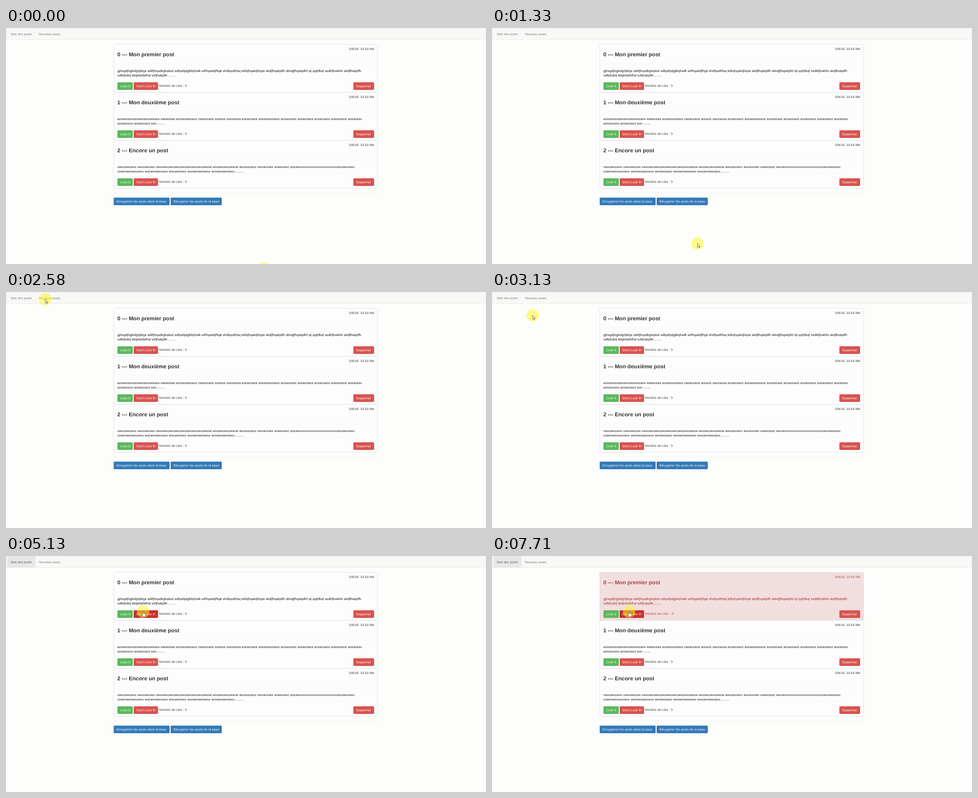
An HTML page for the animation above (8 s loop, 1064 by 526 pixels).

```html
<!DOCTYPE html>
<html lang="fr">
<head>
<meta charset="utf-8">
<style>
  html, body { margin: 0; width: 100%; height: 100%; overflow: hidden; background: #fdfdfb; }
  svg { display: block; }
  text { font: 7px "Liberation Sans", Arial, sans-serif; fill: currentColor; letter-spacing: .15px; text-rendering: geometricPrecision; }
  .title { font-size: 12px; font-weight: bold; letter-spacing: 0; }
  .end { text-anchor: end; }
  .body { stroke: currentColor; stroke-width: .12; }
  .wide { letter-spacing: .25px; }
  .tight { letter-spacing: .06px; }
  .label { fill: #fff; }
  .rule { stroke: #eee; stroke-width: .6; }
  .post { color: #333; }
  .card { fill: #fdfdfd; stroke: #d4d4e4; stroke-width: .6; }
  .post.bad { color: #a94442; }
  .bad .card { fill: #f2dede; }
  .green { fill: #5cb85c; }
  .red { fill: #d9534f; }
  .blue { fill: #337ab7; }
  .red.hover { fill: #c9302c; }
  #nav { color: #777; }
  #status text { font: 6px "Open Sans", sans-serif; fill: #888; letter-spacing: 0; }
  .shape { fill: #fff; stroke: #111; stroke-width: .6; stroke-linejoin: round; }
</style>
</head>
<body>
<svg id="stage" width="1064" height="526" viewBox="0 0 1064 526"></svg>
<script>
const posts = [
  ['Mon premier post', '',
    'gjhsgdjhgjhdghjkfgs sdkfjhqsdkghqksd sdfqshjdgjkfqhsdk sdfhqskdjfhgk shdfqsdhfsq kdfsjhqskdjhqsk skdjfhqskjdfh skkdjjfhqskjdhf sjl qsjhfkqf ssdkfjhskhfs skdjfhskjdfh',
    'sdfkjhskfj ldsjkfsldkfhsl sdfjhskjdfh.........'],
  ['Mon deuxième post', '',
    'azeazeazeazeazeazeazeaze eaeazeae azeazeazeaze zaeazeaze azeaze eazeazea azeazeaze azeazeazeaze azeazeaze azeazeaze azeazeaze azeazeaze azeazeaz',
    'azeazeaze azeazeaze aze.........'],
  ['Encore un post', 'wide',
    'cwxcwxcwxc cwxcwxcwx cwxcwxcwxcwxcwxcwxcwxcwxcwxcw wxcwxcwxcwxcw wxcwxcwxc wxcwxcwx xcwxcwxc wxcw' + 'x'.repeat(22) + 'cwxcwxcwxc',
    'cxwxcwxcwxcwxc wxcwxcwxcwxc wxcwxcwxc wxcwxcwxcwxc wxcwxcwxcwxc.........']
];
const rowHeight = 107;

const text = (x, y, s, cls = '') => `<text x="${x}" y="${y}" class="${cls}">${s}</text>`;
const rule = (x1, x2, y) => `<path class="rule" d="M${x1} ${y}H${x2}"/>`;
const button = (x, y, w, color, s, cls = '') =>
  `<rect class="${color}" x="${x}" y="${y}" width="${w}" height="17" rx="2"/>` +
  text(x + 6.3, y + 10.7, s, 'label ' + cls);

const post = ([title, spacing, line1, line2], i) => `
  <g class="post" transform="translate(0 ${rowHeight * i})">
    <rect class="card" x="238.75" y="36.4" width="585" height="${rowHeight}" rx="1.5"/>
    ${text(816, 49, '5/9/18, 10:53 AM', 'end')}
    ${text(246.8, 62.8, `${i} --- ${title}`, 'title')}
    ${rule(247, 816, 80)}
    ${text(247, 98, line1, 'body ' + spacing)}
    ${text(247, 108, line2, 'body ' + spacing)}
    ${button(247, 121, 34, 'green', 'Love It')}
    ${button(283, 121, 54, 'red', "Don't Love It!", 'tight')}
    <text class="likes" x="339" y="130.7">Nombre de Like : 0</text>
    ${button(770, 121, 46, 'red', 'Supprimer', 'tight')}
  </g>`;

stage.innerHTML = `
  <g id="nav">
    <rect x=".3" y=".3" width="1063.4" height="25.4" rx="2" fill="#f8f8f7" stroke="#dcdcdc" stroke-width=".6"/>
    <rect id="active" x="2.8" y=".5" width="62.4" height="25" fill="#e7e7e7"/>
    <text id="link" x="10.6" y="15.6">liste des posts</text>
    ${text(73, 15.6, 'Nouveau posts', 'tight')}
  </g>
  ${posts.map(post).join('')}
  ${rule(239, 824, 367.3)}
  ${button(238.7, 378, 124, 'blue', 'Enregistrer les posts dans la base')}
  ${button(365, 378, 113.3, 'blue', 'Récupérer les posts de la base')}
  <g id="status">
    <rect x="-2" y="516" width="62" height="12" rx="1.5" fill="#f4f4f4" stroke="#ddd" stroke-width=".5"/>
    ${text(58, 523.6, 'localhost:4200/posts', 'end')}
  </g>
  <g id="cursor">
    <circle r="13.7" fill="#fff51e" fill-opacity=".52"/>
    <path id="arrow" class="shape" d="M0 0V8.7L2 7 3.4 10 4.8 9.5 3.4 6.3H6.2z"/>
    <path id="beam" d="M0-3.5H3M1.5-3.5V6.5M0 6.5H3" stroke="#333" stroke-width=".7"/>
    <path id="hand" class="shape" d="M-1 0H1V4L6 5V8.5L4.5 11.5H-.5L-3 7 -1 6.5z"/>
  </g>`;

// Pointer moves: start, end, x, y, and how far it swings out sideways and down on the way
const moves = [
  [0, 0, 572, 536],
  [80, 830, 466, 315, 300, -300],
  [920, 1670, 768, 297, 420, 180],
  [1750, 1880, 316, 169],
  [2130, 2380, 87, 16, 0, 160],
  [2580, 3100, 90, 52, -30, 0],
  [3210, 3700, 34, 15],
  [4250, 5130, 304, 124]
];
const clicks = [5580, 6710, 7080, 7500, 7710];

const $ = (selector) => stage.querySelector(selector);
const show = (selector, on) => $(selector).setAttribute('visibility', on ? 'visible' : 'hidden');

function pointerAt(t) {
  const i = moves.findLastIndex(([start]) => start <= t);
  const [start, end, x, y, swingX = 0, swingY = 0] = moves[i];
  const [, , x0, y0] = moves[Math.max(0, i - 1)];
  const u = end > start ? Math.min(1, (t - start) / (end - start)) : 1;
  const k = u * u * (3 - 2 * u);
  return [
    x0 + (x - x0) * k + swingX * Math.sin(2 * Math.PI * k),
    y0 + (y - y0) * k + swingY * Math.sin(Math.PI * k)
  ];
}

function draw() {
  const t = performance.now() % 8000;
  const [x, y] = pointerAt(t);
  const onLink = t > 3400 && x < 65 && y < 26;
  const onButton = t > 5000 && y > 121;
  const onText = t > 1860 && t < 2170;
  const likes = -clicks.filter(c => t >= c).length;

  $('#cursor').setAttribute('transform', `translate(${x} ${y})`);
  show('#hand', onLink || onButton);
  show('#beam', onText);
  show('#arrow', !onLink && !onButton && !onText);
  show('#status', onLink);
  show('#active', t >= 4100);
  $('#link').style.fill = t >= 4100 ? '#555' : onLink ? '#333' : '#777';
  $('.red').classList.toggle('hover', onButton);
  $('.post').classList.toggle('bad', likes < 0);
  $('.likes').textContent = `Nombre de Like : ${likes}`;
  requestAnimationFrame(draw);
}
draw();
</script>
</body>
</html>
```
